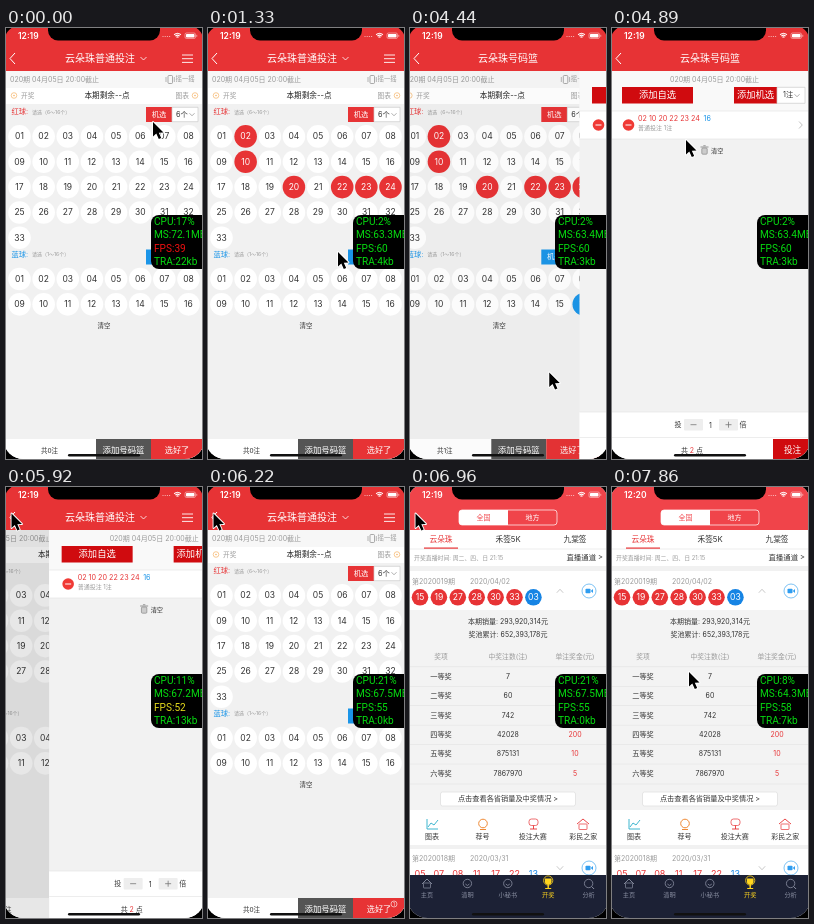
An HTML page with a canvas that plays this animation: 196 by 431 pixels, repeating every 8 s.

```html
<!DOCTYPE html>
<html lang="zh-CN">
<head>
<meta charset="utf-8">
<title>号码篮</title>
<style>
  html, body { margin: 0; width: 100%; height: 100%; overflow: hidden; background: #000; }
  canvas { display: block; width: 196px; height: 431px; }
</style>
</head>
<body>
<canvas id="stage"></canvas>
<script>
const W = 196, H = 431, LOOP = 8000, TICKS = 54, TICK = LOOP / TICKS;
// The phone screen is slightly larger than the stage and cropped by it.
const LEFT = -2.5, TOP = -4, SCREEN_W = 201, SCREEN_H = 435;
const RED = '#e73335', BLUE = '#1b95e8', DARK = '#333', GRAY = '#999', PALE = '#f1f1f1';
const FONT = 'Inter, "Noto Sans CJK SC", "Noto Sans CJK", sans-serif';
const GAME = '云朵珠';

const canvas = document.getElementById('stage');
const ctx = canvas.getContext('2d');
const ratio = Math.max(1, window.devicePixelRatio || 1);
canvas.width = W * ratio;
canvas.height = H * ratio;

// ---------- drawing helpers ----------
function text(s, x, y, size, color = DARK, align = 'center', weight = 400, font = FONT) {
  ctx.font = `${weight} ${size}px ${font}`;
  ctx.textAlign = align;
  ctx.textBaseline = 'middle';
  ctx.fillStyle = color;
  ctx.fillText(s, x, y);
}
function rect(x, y, w, h, color) {
  ctx.fillStyle = color;
  ctx.fillRect(x, y, w, h);
}
const band = (y, h, color) => rect(LEFT, y, SCREEN_W, h, color);
function rounded(x, y, w, h, r, fill, stroke) {
  ctx.beginPath();
  ctx.roundRect(x, y, w, h, r);
  if (fill) { ctx.fillStyle = fill; ctx.fill(); }
  if (stroke) { ctx.strokeStyle = stroke; ctx.lineWidth = 0.7; ctx.stroke(); }
}
function circle(x, y, r, fill, stroke, width = 0.8) {
  ctx.beginPath();
  ctx.arc(x, y, r, 0, 7);
  if (fill) { ctx.fillStyle = fill; ctx.fill(); }
  if (stroke) { ctx.strokeStyle = stroke; ctx.lineWidth = width; ctx.stroke(); }
}
function line(color, width, ...points) {
  ctx.beginPath();
  for (let i = 0; i < points.length; i += 2) ctx.lineTo(points[i], points[i + 1]);
  ctx.strokeStyle = color;
  ctx.lineWidth = width;
  ctx.stroke();
}
const rule = y => band(y - 0.3, 0.6, '#e2e2e2');
const chevron = (x, y, color, dy = 3, dx = 3) => line(color, 0.8, x - dx, y - dy / 2, x, y + dy / 2, x + dx, y - dy / 2);
const two = n => String(n).padStart(2, '0');
function shifted(dx, draw) {
  ctx.save();
  ctx.translate(dx, 0);
  draw();
  ctx.restore();
}

// ---------- shared parts ----------
function navBar(title, hasMenu) {
  band(TOP, 43 - TOP, RED);
  line('#fff', 1, 9, 25, 4, 30.5, 9, 36);
  text(title, hasMenu ? 94 : 98, 31, 10, '#fff');
  if (!hasMenu) return;
  chevron(137.5, 30.5, '#fff');
  for (const y of [27, 30.7, 34.4]) line('#fff', 0.9, 176, y, 187, y);
}
function statusBar(clock) {
  rounded(42, TOP, 112, 16.5, [0, 0, 10, 10], '#000');
  text(clock, 12, 8, 8.5, '#fff', 'left', 600);
  for (let i = 0; i < 4; i++) circle(157 + i * 2.2, 8.5, 0.6, '#ffffffb0');
  for (const r of [1.5, 3.2, 5]) {
    ctx.beginPath();
    ctx.arc(171.5, 10.5, r, -2.3, -0.84);
    ctx.strokeStyle = '#fff';
    ctx.lineWidth = 1.1;
    ctx.stroke();
  }
  rounded(179, 5, 10.5, 5.5, 1.5, null, '#ffffffa0');
  rounded(180, 6, 8.5, 3.5, 0.8, '#fff');
  rect(190.4, 6.8, 0.8, 2, '#ffffffa0');
}
const readings = [
  [0, 17, 72.1, 39, 22], [1, 6, 63.2, 58, 3], [8, 2, 63.3, 60, 4], [15, 2, 63.3, 60, 8],
  [21, 2, 63.4, 60, 4], [28, 2, 63.4, 60, 3], [35, 11, 67.2, 52, 13], [42, 21, 67.5, 55, 0], [49, 8, 64.3, 58, 7]
];
function monitor(tick) {
  const [, cpu, mem, fps, traffic] = readings.findLast(r => r[0] <= tick);
  const green = '#06dc10';
  const fpsColor = fps < 45 ? '#f01010' : fps < 55 ? '#e6dc1c' : green;
  rounded(145, 187, 60, 54, 8, '#000');
  [`CPU:${cpu}%`, `MS:${mem}MB`, `FPS:${fps}`, `TRA:${traffic}kb`].forEach((s, i) =>
    text(s, 148, 194 + i * 13.4, 10.1, i === 2 ? fpsColor : green, 'left', 400, 'Roboto, sans-serif'));
}

// ---------- number picking page ----------
function numberGrid(count, top, chosen, color) {
  for (let n = 1; n <= count; n++) {
    const x = 13.5 + (n - 1) % 8 * 24.14, y = top + Math.floor((n - 1) / 8) * 25.35;
    const on = chosen.includes(n);
    circle(x, y, 11.3, on ? color : '#fff');
    text(two(n), x, y + 0.3, 8.5, on ? '#fff' : DARK);
  }
}
function groupHeader(y, name, hint, color, count) {
  text(name, 5.5, y, 7.3, color, 'left');
  text(hint, 26, y, 5, GRAY, 'left');
  rect(140, y - 5, 26, 15, color);
  text('机选', 153, y + 2.6, 7.3, '#fff');
  rounded(166, y - 4.7, 26, 14.4, 0, '#fff', '#ccc');
  text(count, 170, y + 2.6, 7.3, DARK, 'left');
  chevron(186, y + 2.5, GRAY, 2.5, 2.5);
}
function ringIcon(x) {
  circle(x, 67.5, 2.8, null, '#f5b468', 0.7);
  circle(x, 67.5, 0.8, '#f5b468');
}
function pickPage(tick) {
  const reds = tick >= 3 && tick < 34 ? [2, 10, 20, 22, 23, 24] : [];
  const blues = tick >= 15 && tick < 34 ? [16] : [];
  band(43, H, PALE);
  band(43, 17, '#f7f7f7');
  text('020期 04月05日 20:00截止', 4, 51.5, 7, GRAY, 'left');
  rounded(162, 47.5, 4.5, 8, 1, null, '#888');
  line('#888', 0.6, 160, 49, 160, 54);
  line('#888', 0.6, 168.3, 49, 168.3, 54);
  text('摇一摇', 169.5, 51.5, 6.4, GRAY, 'left');
  band(60, 16, '#fff');
  ringIcon(8);
  text('开奖', 15, 67.5, 6.7, GRAY, 'left');
  text('本期剩余--点', 101, 67.5, 7.6, '#222');
  text('图表', 169.5, 67.5, 6.7, GRAY, 'left');
  ringIcon(189);

  groupHeader(84, '红球:', '请选（6～16个）', RED, '6个');
  numberGrid(33, 108.4, reds, RED);
  groupHeader(226.5, '蓝球:', '请选（1～16个）', BLUE, '1个');
  numberGrid(16, 251, blues, BLUE);
  text('清空', 98, 298.5, 6.5);

  band(411, 20, '#fff');
  rect(90, 411, 55, 20, '#555');
  rect(145, 411, 54, 20, RED);
  text(`共${blues.length}注`, 43.5, 423, 6.5);
  text('添加号码篮', 117.5, 422.3, 8.4, '#fff');
  text('选好了', 171, 422.3, 8.2, '#fff');
  if (tick >= 34) {
    circle(186, 417, 3, RED, '#fff', 0.6);
    text('1', 186, 417.2, 4.5, '#fff');
  }
}

// ---------- basket page ----------
function basketPage() {
  band(43, H, '#f2f2f2');
  band(43, 40, '#f9f9f9');
  text('020期 04月05日 20:00截止', 58, 52, 7, GRAY, 'left');
  rect(10, 59, 71, 16.5, '#d00b0f');
  text('添加自选', 45.5, 67.3, 9.3, '#fff');
  rect(122, 59, 43, 16.5, '#d00b0f');
  text('添加机选', 143.5, 67.3, 9.3, '#fff');
  rounded(165, 59.3, 28, 16, 0, '#fff', '#ccc');
  text('1注', 171, 67.3, 7.2, DARK, 'left');
  chevron(185, 67.5, GRAY, 2.5, 2.5);

  band(83, 28, '#fff');
  rule(83);
  rule(111);
  circle(16.5, 97, 5.8, '#f03a35');
  line('#fff', 1.2, 13.5, 97, 19.5, 97);
  text('02 10 20 22 23 24', 26, 91, 7.2, RED, 'left');
  text('16', 91.5, 91, 7.2, BLUE, 'left');
  text('普通投注 1注', 26, 100.5, 6, GRAY, 'left');
  line('#bbb', 0.9, 187, 93.5, 190.3, 97, 187, 100.5);

  rounded(89.8, 120, 5.4, 6.2, 1, '#ccc', '#888');
  line('#888', 0.9, 88.5, 119, 96.5, 119);
  line('#888', 0.8, 91.3, 117.7, 93.7, 117.7);
  text('清空', 99, 122.7, 6.2, DARK, 'left');

  band(384, 47, '#fff');
  rule(384);
  rule(409.5);
  text('投', 66, 397, 7);
  text('1', 98.5, 397.5, 7);
  text('倍', 131, 397, 7);
  for (const x of [72, 107]) {
    rounded(x, 391, 19, 11.5, 1, '#eee');
    line('#777', 0.8, x + 6.5, 396.7, x + 12.5, 396.7);
  }
  line('#777', 0.8, 116.5, 393.7, 116.5, 399.7);
  text('共', 69, 423, 7, DARK, 'left');
  text('2', 80, 423, 7, RED);
  text('点', 84, 423, 7, DARK, 'left');
  rect(161, 411, 38, 20, '#d00b0f');
  text('投注', 180.5, 422, 8.6, '#fff');
}

// ---------- results page ----------
function drawHeader(y, issue, date, arrow) {
  text(issue, 2, y, 7, GRAY, 'left');
  text(date, 60, y, 7, GRAY, 'left');
  chevron(150, y + 9.5, '#bbb', arrow, 3.2);
  circle(179, y + 9.5, 7, '#fff', '#45a8ee', 0.7);
  rounded(175.5, y + 7.3, 5, 4.4, 0.8, '#2f9df0');
  ctx.beginPath();
  for (const [x, dy] of [[180.7, 9.5], [183, 7.5], [183, 11.5]]) ctx.lineTo(x, y + dy);
  ctx.fill();
}
function shortcutIcons() {
  line('#29aeca', 0.9, 17, 332, 17, 342, 28, 342);
  line('#29aeca', 0.9, 18, 340, 21, 336, 24, 338, 28, 333);
  circle(73, 336.5, 4.3, null, '#f08a35', 1);
  line('#f08a35', 1, 70, 342.5, 76, 342.5);
  rounded(119, 332, 9, 6.5, 2.5, null, RED);
  line(RED, 0.9, 123.5, 338.5, 123.5, 342);
  line(RED, 0.9, 120, 342, 127, 342);
  line(RED, 0.9, 167, 337, 173, 332, 179, 337);
  rounded(169, 337, 8, 5.5, 0.5, null, RED);
}
function tabBar() {
  band(388, 43, '#1c2135');
  ['主页', '清明', '小秘书', '开奖', '分析'].forEach((name, i) => {
    const x = 17 + i * 40.4, color = i === 3 ? '#ffd51e' : '#8b90a3';
    text(name, x, 408, 6.2, color);
    if (i === 0) {
      line(color, 0.9, x - 5, 397, x, 392, x + 5, 397);
      rounded(x - 3.5, 396, 7, 5, 0.5, null, color);
    } else if (i === 3) {
      rounded(x - 3.3, 391.5, 6.6, 6, [0, 0, 3, 3], color);
      circle(x, 393.5, 4.6, null, color, 0.8);
      line(color, 1.4, x, 397, x, 401);
      line(color, 1.2, x - 3, 401.5, x + 3, 401.5);
    } else {
      circle(x, 396.5, 4.2, null, color);
      if (i === 4) line(color, 1, x + 3, 399.5, x + 5.5, 402);
      else line(color, 0.8, x - 2, 397, x, 398.5, x + 2, 397);
    }
  });
}
function resultsPage() {
  band(TOP, SCREEN_H, '#fff');
  band(TOP, 43 - TOP, '#f0444a');
  rounded(49, 23, 98, 15, 3, null, '#fff');
  rounded(49, 23, 49, 15, [3, 0, 0, 3], '#fff');
  text('全国', 73.5, 30.7, 7, '#f0444a');
  text('地方', 122.5, 30.7, 7, '#fff');
  [GAME, '禾签5K', '九棠签'].forEach((name, i) => text(name, 31 + i * 67, 52.5, 7.7, i ? DARK : RED));
  rule(62);
  rect(14, 60.5, 34, 1.2, RED);
  text('开奖直播时间: 周二、四、日 21:15', 4, 71, 5.9, GRAY, 'left');
  text('直播通道 >', 193, 71, 7.4, DARK, 'right');
  band(79, 5, PALE);

  drawHeader(94.5, '第2020019期', '2020/04/02', -3.5);
  [15, 19, 27, 28, 30, 33, 3].forEach((n, i) => {
    const x = 10 + i * 18.9;
    circle(x, 110.3, 8.3, i < 6 ? RED : '#1684e4');
    text(two(n), x, 110.6, 8.6, '#fff');
  });
  band(123, 200, '#f3f3f3');
  text('本期销量: 293,920,314元', 98, 134.5, 7);
  text('奖池累计: 652,393,178元', 98, 148, 7);
  ['奖项', '中奖注数(注)', '单注奖金(元)'].forEach((s, i) => text(s, 31 + i * 67, 170, 6.8, GRAY));
  const counts = [7, 60, 742, 42028, 875131, 7867970], prizes = ['', '', '', 200, 10, 5];
  counts.forEach((n, i) => {
    const y = 189.5 + i * 19.45;
    rule(y - 9.7);
    text('一二三四五六'[i] + '等奖', 31, y, 7.2);
    text(n, 98, y, 7);
    text(prizes[i], 165, y, 7, RED);
  });
  rule(297);
  rounded(30.5, 305, 135, 14, 2, '#fff', '#ddd');
  text('点击查看各省销量及中奖情况 >', 98, 312, 7.2);

  shortcutIcons();
  ['图表', '荐号', '投注大赛', '彩民之家'].forEach((s, i) => text(s, 22 + i * 50.4, 350, 7));
  band(358, 4, PALE);
  drawHeader(371.5, '第2020018期', '2020/03/31', 3.5);
  [5, 7, 8, 11, 17, 22, 13].forEach((n, i) => text(two(n), 10 + i * 18.9, 387, 9, i < 6 ? RED : '#1684e4'));
  tabBar();
}

// ---------- pointer ----------
const pointerKeys = [
  [0, 147, 94], [1, 147, 90], [4, 147, 90], [8, 128, 212], [9, 130, 224], [12, 136, 232], [19, 136, 232],
  [20, 137, 401], [21, 150, 450], [23, 150, 450], [24, 163, 423], [26, 161, 422], [29, 161, 422],
  [33, 74, 112], [35, 74, 112], [37, 5.5, 26.5], [50, 5.5, 26.5], [53, 77, 185]
];
function pointer(tick) {
  const i = pointerKeys.findLastIndex(k => k[0] <= tick);
  const [t0, x0, y0] = pointerKeys[i], [t1, x1, y1] = pointerKeys[i + 1] || [t0 + 1, x0, y0];
  const u = (tick - t0) / (t1 - t0);
  ctx.save();
  ctx.translate(x0 + (x1 - x0) * u, y0 + (y1 - y0) * u);
  ctx.beginPath();
  for (const p of [[0, 0], [0, 14.5], [3.3, 11.6], [5.8, 17], [8.2, 16], [5.8, 10.7], [10.5, 10.5]]) ctx.lineTo(...p);
  ctx.closePath();
  ctx.lineJoin = 'round';
  ctx.strokeStyle = '#fff';
  ctx.lineWidth = 1.8;
  ctx.stroke();
  ctx.fillStyle = '#000';
  ctx.fill();
  ctx.restore();
}

// ---------- page transitions ----------
function slide(tick, start) {
  const x = Math.max(0, (tick * TICK - start) / 1000 * 15);
  const p = 1 - (1 + x) * Math.exp(-x);
  return p > 0.94 ? 1 : p;
}
// `open` is how far the upper page has moved away to the right, 0 to 1.
function stack(open, top, shade, lower, upper) {
  if (open > 0) {
    shifted(-0.3 * SCREEN_W * (1 - open), lower);
    band(top, SCREEN_H, `rgba(0,0,0,${shade * (1 - open)})`);
  }
  if (open < 1) shifted(SCREEN_W * open, upper);
}
function draw(tick) {
  ctx.setTransform(ratio, 0, 0, ratio, 0, 0);
  rect(0, 0, W, H, '#000');
  ctx.save();
  ctx.beginPath();
  ctx.roundRect(LEFT, TOP, SCREEN_W, SCREEN_H, 20);
  ctx.clip();

  const inBasket = tick >= 30 && tick < 40;
  const basketOpen = tick < 40 ? 1 - slide(tick, 4400) : slide(tick, 5866);
  stack(slide(tick, 6651), TOP, 0.6,
    () => { resultsPage(); monitor(tick); },
    () => {
      stack(basketOpen, 43, 0.12, () => pickPage(tick), basketPage);
      navBar(GAME + (inBasket ? '号码篮' : '普通投注'), !inBasket);
      monitor(tick);
    });

  statusBar(tick < 48 ? '12:19' : '12:20');
  rounded(62, 426, 72, 2.6, 1.3, '#111');
  pointer(tick);
  ctx.restore();
}

const began = performance.now();
function frame() {
  const time = (performance.now() - began) % LOOP;
  draw(Math.min(TICKS - 1, Math.floor((time + 14) / TICK)));
  requestAnimationFrame(frame);
}
frame();
</script>
</body>
</html>
```
